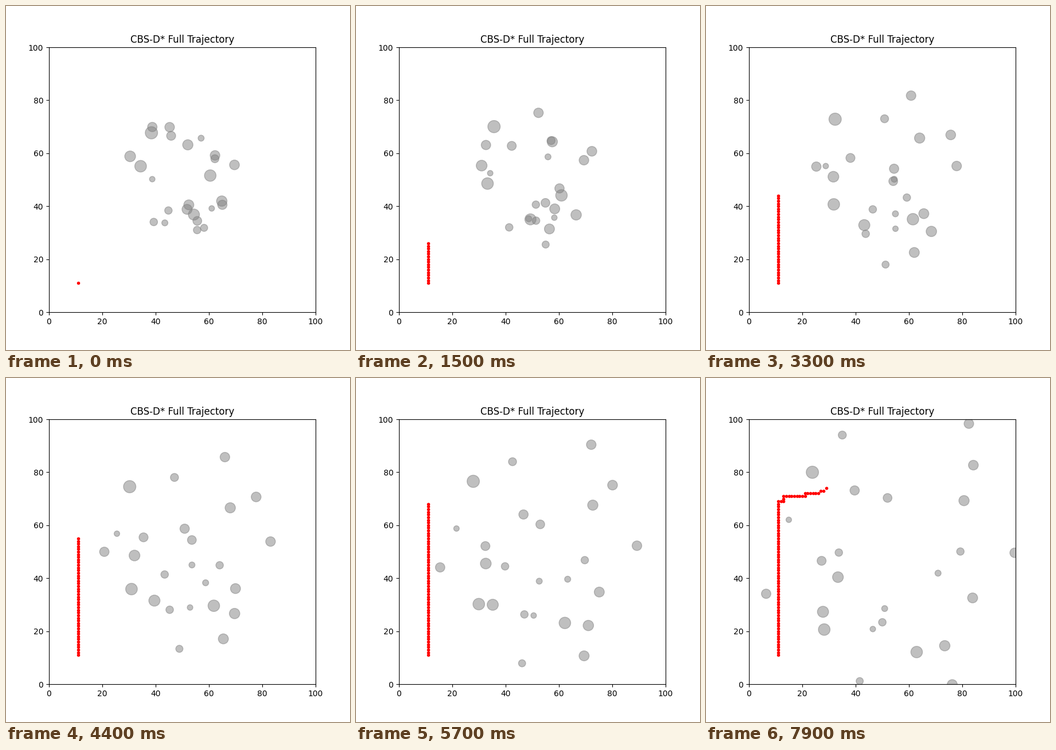
Animation of 600x600 px, one loop 8000 ms. Source, as a matplotlib script:

```python
import random

import matplotlib.pyplot as plt
from matplotlib.animation import FuncAnimation
from matplotlib.patches import Circle

FRAMES = 80
INTERVAL = 100
SIZE = 100
OBSTACLES = 25
CORNERS = [(11, 11), (11, 69), (13, 69), (13, 71), (21, 71),
           (21, 72), (26, 72), (27, 73), (28, 73), (29, 74)]

random.seed(42)


def drift(pos, vel):
    """Coordinate per frame, turning back once a wall is passed."""
    track = []
    for _ in range(FRAMES):
        track.append(pos)
        pos += vel
        if not 0 <= pos <= SIZE:
            vel = -vel
    return track


def make_obstacle():
    x, y = random.uniform(30, 70), random.uniform(30, 70)
    radius = random.uniform(1, 2.5)
    vx, vy = random.uniform(-0.5, 0.5), random.uniform(-0.5, 0.5)
    return radius, list(zip(drift(x, vx), drift(y, vy)))


def walk(corners):
    """Grid cells visited one step at a time from corner to corner."""
    cells = [corners[0]]
    for (x0, y0), (x1, y1) in zip(corners, corners[1:]):
        n = max(abs(x1 - x0), abs(y1 - y0))
        cells += [(x0 + (x1 - x0) * i / n, y0 + (y1 - y0) * i / n)
                  for i in range(1, n + 1)]
    return cells


obstacles = [make_obstacle() for _ in range(OBSTACLES)]
path = walk(CORNERS)

fig, ax = plt.subplots(figsize=(6, 6), dpi=100)
fig.subplots_adjust(left=0.1248)
ax.set_xlim(0, SIZE)
ax.set_ylim(0, SIZE)
ax.set_title("CBS-D* Full Trajectory")

circles = [ax.add_patch(Circle(track[0], radius, color="gray", alpha=0.5))
           for radius, track in obstacles]
trail, = ax.plot([], [], "ro", markersize=3)


def update(frame):
    for circle, (_, track) in zip(circles, obstacles):
        circle.center = track[frame]
    trail.set_data(*zip(*path[:frame + 1]))
    return [*circles, trail]


anim = FuncAnimation(fig, update, frames=FRAMES, interval=INTERVAL,
                     repeat=True, repeat_delay=0)
plt.show()
```
